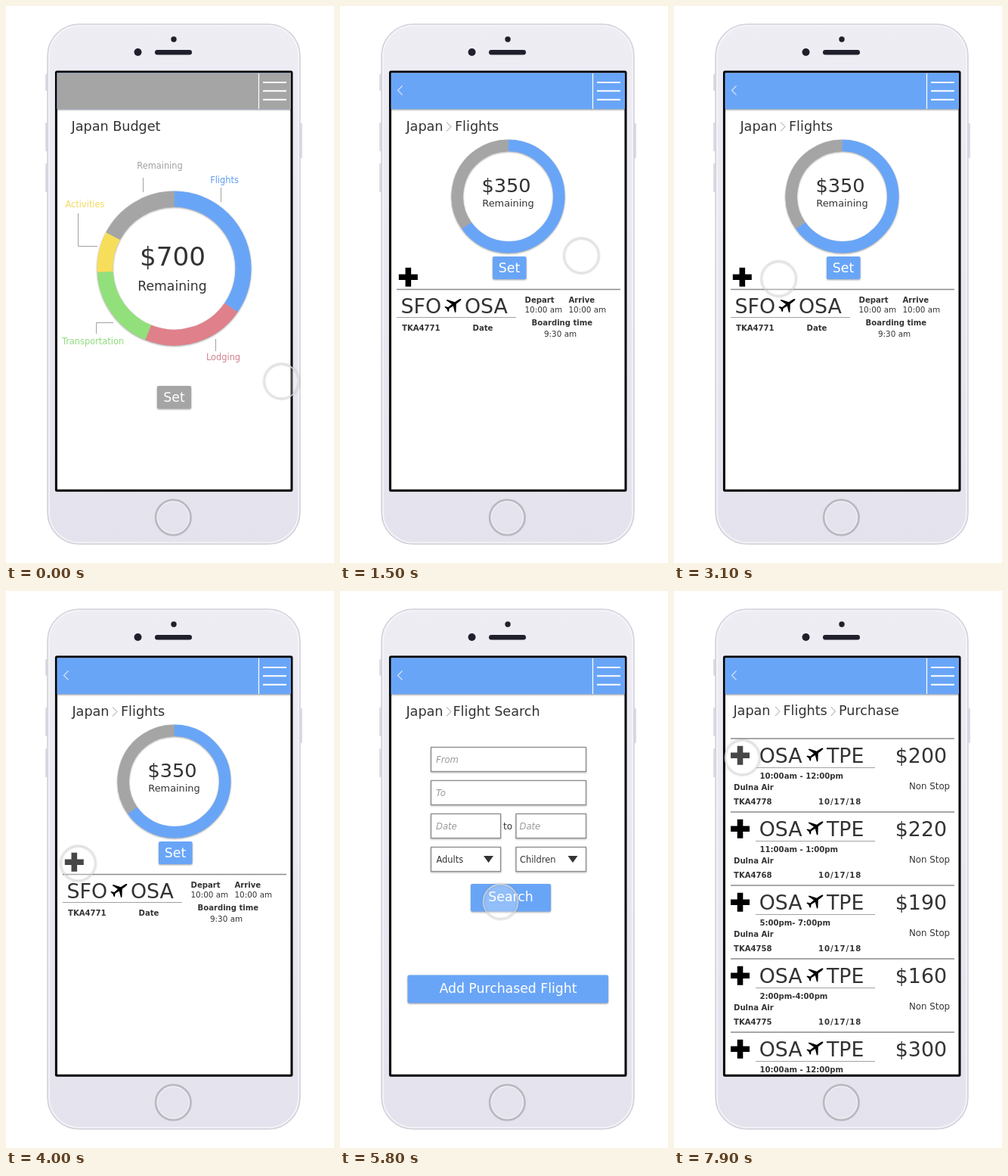
These frames come from a looping animation (434 px wide and 736 px high, 8000 ms). An HTML page:

```html
<!DOCTYPE html>
<html lang="en">
<head>
<meta charset="utf-8">
<title>Trip budget</title>
<style>
html, body { margin: 0; width: 100%; height: 100%; overflow: hidden; background: #fff; }
svg { display: block; width: 434px; height: 736px; }
text { font-family: "DejaVu Sans", sans-serif; fill: #333; white-space: pre; }

.title { font-size: 17.6px; }
.big { font-size: 26.8px; }
.label { font-size: 11.4px; }
.small { font-size: 10.4px; }
.bold { font-size: 10.1px; font-weight: bold; }
.hint { font-size: 11.6px; font-style: italic; fill: #999; }
.mid { text-anchor: middle; }
.end { text-anchor: end; }
.btn text { font-size: 17.3px; fill: #fff; text-anchor: middle; }
.btn rect { fill: #69a5f7; }
.btn, .ring { filter: drop-shadow(0 1.5px 1px rgba(0, 0, 0, .38)); }
.ring circle { fill: none; }
.field { fill: #fff; stroke: #8c8c8c; stroke-width: 1.3; filter: drop-shadow(0 1px 1px rgba(0, 0, 0, .3)); }
.rule { stroke: #8a8a8a; stroke-width: 1.4; }
.thin { stroke: #a2a2a2; stroke-width: 1; fill: none; }
.crumb { stroke: #c2c2c2; stroke-width: 1.1; fill: none; }

.page { visibility: hidden; animation: 8s step-end infinite; }
#budget { animation-name: budget; }
#flights { animation-name: flights; }
#search { animation-name: search; }
#purchase { animation-name: purchase; }
@keyframes budget { 0% { visibility: visible } 17.5%, 100% { visibility: hidden } }
@keyframes flights { 0% { visibility: hidden } 17.5% { visibility: visible } 51.25%, 100% { visibility: hidden } }
@keyframes search { 0% { visibility: hidden } 51.25% { visibility: visible } 73.75%, 100% { visibility: hidden } }
@keyframes purchase { 0% { visibility: hidden } 73.75%, 100% { visibility: visible } }

/* Separate axes give the pointer its curved path. */
#px { animation: px 8s ease-in-out infinite; }
#py { animation: py 8s ease-in-out infinite; }
@keyframes px {
  0% { transform: translateX(364.5px) }
  12.5%, 23.1% { transform: translateX(319.5px) }
  45.6%, 62% { transform: translateX(95.5px) }
  71.9%, 83.1% { transform: translateX(212.5px) }
  93.1%, 100% { transform: translateX(90.5px) }
}
@keyframes py {
  0% { transform: translateY(496px) }
  12.5%, 22.5% { transform: translateY(330px) }
  30% { transform: translateY(361px) }
  45.6%, 61% { transform: translateY(360px) }
  69.5%, 83.1% { transform: translateY(410.5px) }
  93.1%, 100% { transform: translateY(220px) }
}
</style>
</head>
<body>
<svg viewBox="0 0 434 736">
  <defs>
    <linearGradient id="shell" x2="0" y2="1">
      <stop stop-color="#eeedf4"/><stop offset="1" stop-color="#e4e3ed"/>
    </linearGradient>
    <clipPath id="screen"><rect x="67.5" y="88" width="309.5" height="551"/></clipPath>
    <path id="plus" d="M-12.5 0H12.5M0-12.5V12.5" stroke="#000" stroke-width="7.6" stroke-linejoin="round"/>
    <path id="plane" transform="rotate(55)" d="M0-12.5C1.5-12.5 1.6-9 1.6-3.500L10 2.800V4.500L1.600 1.400 1.100 7.500 4 10V11.500L0 10.500-4 11.500V10L-1.100 7.500-1.600 1.400-10 4.500V2.800L-1.600-3.500C-1.600-9-1.500-12.500 0-12.500Z"/>
    <path id="sep" class="crumb" d="M0-6 6 0 0 6"/>
    <path id="drop" d="M-6.5-4.5H6.5L0 4.5Z" fill="#333"/>
  </defs>

  <g fill="#dcdbe3">
    <rect x="52" y="90" width="4" height="22" rx="1"/>
    <rect x="52" y="154" width="4" height="38" rx="1"/>
    <rect x="52" y="208" width="4" height="38" rx="1"/>
    <rect x="388" y="155" width="4" height="46" rx="1"/>
  </g>
  <rect x="55" y="24" width="334" height="687" rx="42" fill="url(#shell)" stroke="#d3d2da" stroke-width="1.6"/>
  <rect x="57" y="26" width="330" height="683" rx="40" fill="none" stroke="#f5f5fa" stroke-width="1.5"/>
  <g fill="#20202c">
    <circle cx="222" cy="44" r="3.7"/>
    <circle cx="174.5" cy="61" r="5"/>
    <rect x="197" y="58" width="49" height="6.4" rx="3.2"/>
  </g>
  <circle cx="221.3" cy="675.800" r="23.2" fill="none" stroke="#b9b9c1" stroke-width="2.8"/>
  <circle cx="221.3" cy="675.800" r="21.2" fill="none" stroke="#f4f4f8"/>
  <rect x="66.4" y="87" width="311.600" height="553.200" rx="1" fill="#fff" stroke="#000" stroke-width="3"/>

  <g clip-path="url(#screen)">
    <g style="filter:drop-shadow(0 1px 1px rgba(0,0,0,.4))">
      <rect x="67" y="88.500" width="311" height="47.800" fill="#69a5f7"/>
    </g>
    <path d="M82.5 105.5 76.5 111.5 82.5 117.5" fill="none" stroke="#d6e5fb" stroke-width="1.1"/>

    <g id="budget" class="page">
      <rect x="67" y="88.500" width="311" height="47.800" fill="#a5a5a6"/>
      <text class="title end" x="204.500" y="165">Japan Budget</text>
      <g class="ring" data-ring="222.5 346.5 91.5 21" data-parts="#69a5f7 124.6 #e0808a 202 #92e07c 267 #f7de5a 297.8 #a5a5a5 360"></g>
      <path class="thin" d="M181.5 227V246M284.500 240V259M95.500 274V317.500H121M142 418.500H119.500V433M277.500 440V456"/>
      <g class="label mid">
        <text x="203.5" y="215" style="fill:#a0a0a0">Remaining</text>
        <text x="289" y="234" style="fill:#5e9cf0">Flights</text>
        <text x="104.500" y="266" style="fill:#f2d95c">Activities</text>
        <text x="115" y="447" style="fill:#8fdd7b">Transportation</text>
        <text x="287.500" y="468" style="fill:#d0808c">Lodging</text>
      </g>
      <text class="mid" x="220.5" y="342.500" font-size="34.2">$700</text>
      <text class="mid" x="220" y="376" font-size="17.2">Remaining</text>
      <g class="btn">
        <rect x="200" y="502" width="45" height="30" rx="2" style="fill:#a5a5a6"/>
        <text x="222.5" y="523">Set</text>
      </g>
    </g>

    <g id="flights" class="page">
      <text class="title end" x="136.500" y="165">Japan</text>
      <use href="#sep" x="141" y="159.500"/>
      <text class="title" x="152" y="165">Flights</text>
      <g class="ring" data-ring="222.5 251.5 67.25 15.5" data-parts="#69a5f7 235 #a5a5a5 360"></g>
      <text class="mid" x="220" y="246" font-size="25.6">$350</text>
      <text class="mid" x="222.5" y="265" font-size="12.9">Remaining</text>
      <g class="btn">
        <rect x="202" y="331" width="44.500" height="30" rx="2"/>
        <text x="224" y="352">Set</text>
      </g>
      <use href="#plus" x="90.3" y="358.3"/>
      <path class="rule" d="M75 374.500H371"/>
      <text class="big" x="80.500" y="405.500">SFO</text>
      <use href="#plane" x="150" y="394.500"/>
      <text class="big" x="165" y="405.500">OSA</text>
      <path class="thin" d="M75 411.500H233"/>
      <g class="bold">
        <text x="82" y="429">TKA4771</text>
        <text x="175.500" y="429">Date</text>
        <text x="244.500" y="392">Depart</text>
        <text x="302.500" y="392">Arrive</text>
        <text x="253.500" y="422">Boarding time</text>
      </g>
      <g class="small">
        <text x="244.500" y="405">10:00 am</text>
        <text x="302.500" y="405">10:00 am</text>
        <text x="270" y="437">9:30 am</text>
      </g>
    </g>

    <g id="search" class="page">
      <text class="title end" x="136.500" y="165">Japan</text>
      <use href="#sep" x="141" y="159.500"/>
      <text class="title" x="149.500" y="165">Flight Search</text>
      <g class="field">
        <rect x="120.500" y="206.500" width="205" height="32"/>
        <rect x="120.500" y="250.500" width="205" height="32"/>
        <rect x="120.500" y="294.500" width="92" height="32"/>
        <rect x="233" y="294.500" width="92.500" height="32"/>
        <rect x="120.500" y="338.500" width="92" height="32"/>
        <rect x="233" y="338.500" width="92.500" height="32"/>
      </g>
      <text class="hint" x="127" y="227">From</text>
      <text class="hint" x="127" y="271">To</text>
      <text class="hint" x="127" y="315">Date</text>
      <text class="hint" x="237.500" y="315">Date</text>
      <text x="216" y="315" font-size="12">to</text>
      <text class="label" x="127.500" y="359">Adults</text>
      <text class="label" x="238" y="359">Children</text>
      <use href="#drop" x="196.500" y="354.500"/>
      <use href="#drop" x="308" y="354.500"/>
      <g class="btn">
        <rect x="173" y="387" width="106" height="36.500" rx="2"/>
        <text x="226" y="409.500">Search</text>
        <rect x="89.500" y="507.500" width="265.500" height="37" rx="2"/>
        <text x="222.500" y="530.500">Add Purchased Flight</text>
      </g>
    </g>

    <g id="purchase" class="page">
      <text class="title end" x="127.500" y="164">Japan</text>
      <use href="#sep" x="134" y="159"/>
      <text class="title" x="144.500" y="164">Flights</text>
      <use href="#sep" x="207.500" y="159"/>
      <text class="title" x="218" y="164">Purchase</text>
    </g>

    <path d="M334.500 89V136" stroke="#fff" stroke-width="1.2"/>
    <path d="M340 101H371M340 112.300H371M340 123.800H371" stroke="#fff" stroke-width="2"/>
  </g>

  <g id="px"><g id="py">
    <circle r="23" fill="#fff" fill-opacity=".28"/>
    <circle r="23" fill="none" stroke="#e2e2e2" stroke-width="1.3" style="filter:drop-shadow(0 .5px 1.2px rgba(0,0,0,.3))"/>
  </g></g>
</svg>
<script>
for (const g of document.querySelectorAll('.ring')) {
  const [cx, cy, r, w] = g.dataset.ring.split(' ');
  const parts = g.dataset.parts.split(' ');
  let from = 0;
  for (let i = 0; i < parts.length; i += 2) {
    const sweep = parts[i + 1] - from;
    g.innerHTML += `<circle cx="${cx}" cy="${cy}" r="${r}" pathLength="360" stroke="${parts[i]}" stroke-width="${w}"
      stroke-dasharray="${sweep} ${360 - sweep}" transform="rotate(${from - 90} ${cx} ${cy})"/>`;
    from = +parts[i + 1];
  }
}

const offers = [
  ['10:00am - 12:00pm', 'TKA4778', 200],
  ['11:00am - 1:00pm', 'TKA4768', 220],
  ['5:00pm- 7:00pm', 'TKA4758', 190],
  ['2:00pm-4:00pm', 'TKA4775', 160],
  ['10:00am - 12:00pm', 'TKA4778', 300]
];
document.getElementById('purchase').innerHTML += offers.map(([time, code, price], i) => `
  <g transform="translate(0 ${195 + 97 * i})">
    <path class="rule" d="M75 0H371"/>
    <use href="#plus" x="87.5" y="22.3"/>
    <text class="big" x="112.7" y="32">OSA</text>
    <use href="#plane" x="187" y="20"/>
    <text class="big" x="202" y="32">TPE</text>
    <path class="thin" d="M108 38.5H266"/>
    <text class="big" x="292.8" y="32">$${price}</text>
    <text class="bold" x="113.5" y="53">${time}</text>
    <text class="bold" x="79" y="68">Dulna Air</text>
    <text class="bold" x="79" y="87">${code}</text>
    <text class="bold" x="191" y="87" letter-spacing=".95">10/17/18</text>
    <text class="label" x="311" y="67" style="font-size:11.8px">Non Stop</text>
  </g>`).join('');
</script>
</body>
</html>
```
